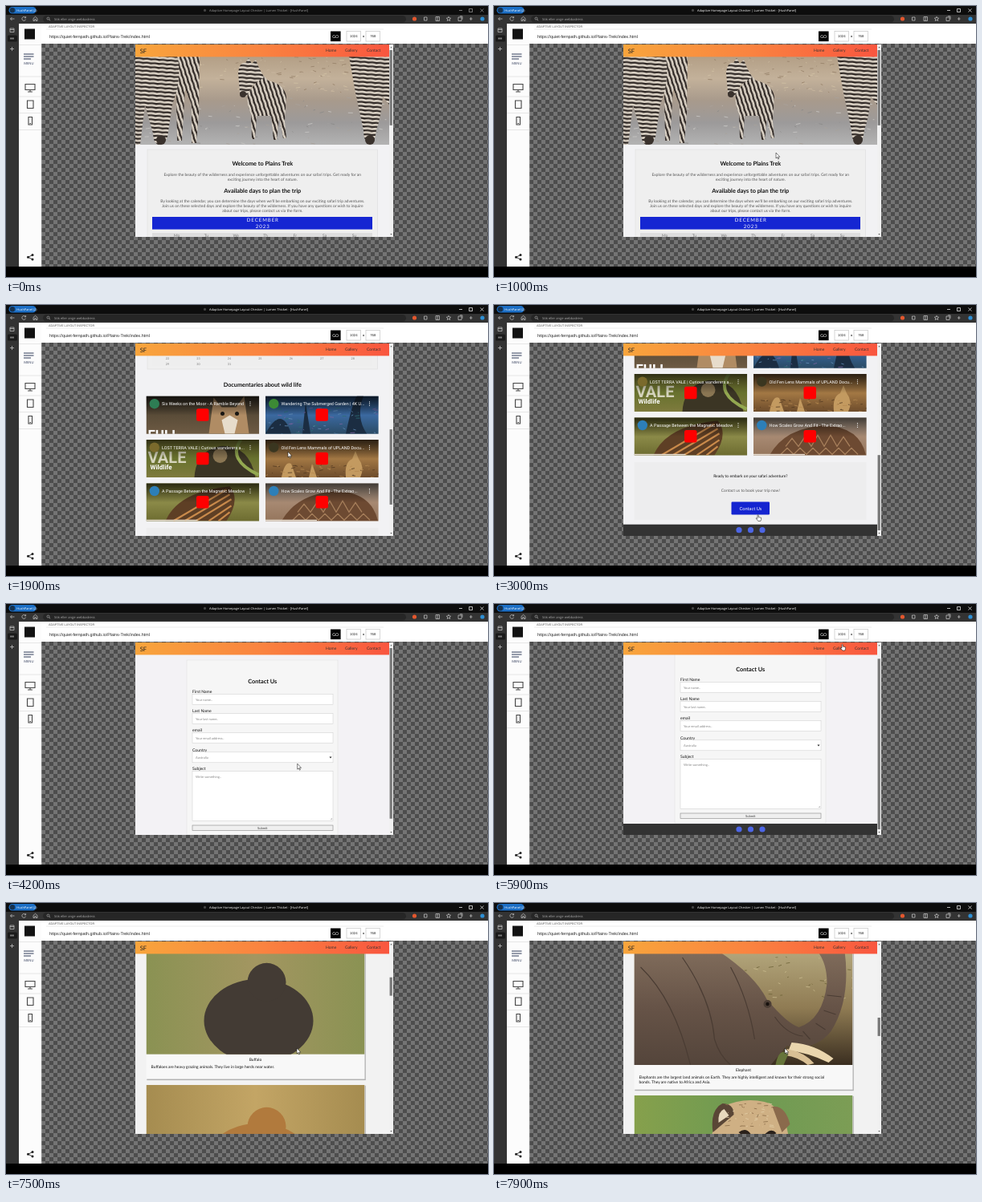
An HTML page that plays this animation: 600x338 px, repeating every 8000 ms.

```html
<!DOCTYPE html>
<html lang="en">
<head>
<meta charset="utf-8">
<title>Site preview</title>
<style>
  html, body { margin: 0; width: 100%; height: 100%; overflow: hidden; background: #000; }
  #stage { display: block; width: 600px; height: 338px; font-family: Lato, sans-serif; text-rendering: geometricPrecision; }
  .ui { font-family: "Open Sans", sans-serif; }
  .arial { font-family: "Liberation Sans", sans-serif; }
  .roboto { font-family: Roboto, sans-serif; }
  .bold { font-weight: 700; }
  .mid { text-anchor: middle; }
</style>
</head>
<body>
<svg id="stage" viewBox="0 0 600 338"></svg>
<script>
const rect = (x, y, w, h, fill, more = '') => `<rect x="${x}" y="${y}" width="${w}" height="${h}" fill="${fill}" ${more}/>`;
const disc = (x, y, r, fill, more = '') => `<circle cx="${x}" cy="${y}" r="${r}" fill="${fill}" ${more}/>`;
const path = (d, fill, more = '') => `<path d="${d}" fill="${fill}" ${more}/>`;
const line = (d, color, width = .7) => path(d, 'none', `stroke="${color}" stroke-width="${width}"`);
const text = (x, y, size, fill, str, cls = '', more = '') =>
  `<text x="${x}" y="${y}" font-size="${size}" fill="${fill}" class="${cls}" ${more}>${str}</text>`;
const centered = (y, size, fill, str, cls = '') => text(319.3, y, size, fill, str, 'mid ' + cls);
const heading = (y, str) => centered(y, 7.3, '#111', str, 'bold');
const crop = (x, y, w, h, inner) => `<svg x="${x}" y="${y}" width="${w}" height="${h}">${inner}</svg>`;

const gradients = [];
function gradient(colors, across = false) {
  const id = 'g' + gradients.length;
  const stops = colors.map((c, i) => `<stop offset="${i / (colors.length - 1)}" stop-color="${c}"/>`).join('');
  gradients.push(`<linearGradient id="${id}" x2="${across ? 1 : 0}" y2="${across ? 0 : 1}">${stops}</linearGradient>`);
  return `url(#${id})`;
}

let seed = 7;
const random = () => (seed = seed * 16807 % 2147483647) / 2147483647;
function specks(count, x, y, w, h, colors) {
  let out = '';
  for (let i = 0; i < count; i++) {
    const px = x + random() * w, py = y + random() * h;
    out += line(`M${px.toFixed(1)} ${py.toFixed(1)}l${(random() * 6).toFixed(1)} ${(random() * 3 - 1.5).toFixed(1)}`, colors[i % colors.length], .8);
  }
  return out;
}

// Photographs, as simple shapes
const hero = rect(0, 0, 316, 110, gradient(['#b39f86', '#c3b19a', '#a89a8c', '#9c9a9a', '#b3b3b3'])) +
  specks(150, 0, 0, 316, 45, ['#d2c2a5', '#957f68', '#c9b8a0']) +
  specks(90, 0, 50, 316, 60, ['#8b8988', '#c9c8c6', '#a9a29b']) +
  path('M50 0H80L79 70 76 108H70L70 60 62 40 58 105H52Z', 'url(#slant)') +
  path('M0 0H52C58 20 52 45 46 60L40 100Q36 110 28 110Q22 106 22 96L12 60 6 110H0Z', 'url(#flat)') +
  disc(32, 104, 6, '#3a322d') +
  path('M140 46Q138 60 144 72L145 103H149L151 74H169L172 104H176L179 76 184 102H188L186 80 188 50Q185 34 165 30L158 22Z', 'url(#slant)') +
  path('M128 20Q130 6 137 8L141 2 145 9 150 4 153 12 160 26 146 36 138 50Q130 52 130 44Z', 'url(#flat)') +
  disc(134, 47, 4, '#3a322d') +
  path('M266 0H316V60L308 50Q306 75 300 92Q298 109 291 110Q284 106 284 92L274 45Z', 'url(#flat)') +
  disc(292, 104, 6, '#3a322d');

const aardvark = rect(0, 0, 272, 142, gradient(['#9b9070', '#857957', '#8e815f'])) +
  specks(90, 0, 0, 272, 30, ['#b3a783', '#766a4b']) +
  path('M0 22Q60 8 120 14Q200 18 272 40V80Q200 84 150 110L40 100Q20 60 0 50Z', gradient(['#4e4534', '#2d2822'])) +
  path('M0 68Q40 90 70 110L140 112Q190 100 230 78Q255 66 272 60V142H0Z', '#a99a79') +
  specks(230, 0, 100, 272, 42, ['#cdbf9d', '#837655', '#bdae8b']) +
  path('M56 40Q64 16 100 14Q122 14 130 28L146 22Q150 40 158 58L166 74Q166 82 160 82L140 70Q136 84 128 90L122 124H108L106 100Q94 92 84 104L80 122H70L72 96Q60 110 58 130H52Q54 100 52 72Z', gradient(['#5d5140', '#372f28'])) +
  path('M114 14Q128 18 134 32L126 36Z', '#d8512e') + path('M143 14Q152 26 148 40L142 34Z', '#a5513c') +
  disc(150, 53, 1.2, '#111');

const elephant = rect(0, 0, 272, 142, gradient(['#b3a67c', '#8f7b53', '#3a2e20'])) +
  specks(60, 100, 0, 172, 60, ['#c9bb8f', '#6d6338']) +
  path('M0 0H105Q150 30 165 60Q190 90 205 95Q235 85 240 40Q240 15 228 0H262Q270 60 245 100Q225 125 190 118L170 142H0Z', gradient(['#806c5b', '#665347', '#54453b'])) +
  line('M8 20Q50 60 70 142M60 8Q96 60 100 110Q106 130 120 142M120 20Q142 60 150 110M175 82Q190 104 210 106M210 100l9 10M226 90l12 8M236 74l15 5M240 55l18 2', '#4a3c33', 1.2) +
  disc(166, 66, 5, '#4b3d34') + disc(166, 66, 2.2, '#17110e') +
  path('M196 114Q225 116 248 134L242 139Q215 126 192 124Z', '#ead6ae') +
  path('M190 122Q212 126 224 140L216 142Q204 132 188 130Z', '#d9c095') +
  path('M176 142Q180 120 192 128L186 142Z', '#66743a');

const cheetah = rect(0, 0, 272, 142, gradient(['#86a04c', '#6d9a52', '#7c9d55'], true)) +
  path('M84 142Q92 40 110 14Q136 2 162 8Q186 14 192 50L206 142Z', '#cfb084') +
  path('M98 46Q94 18 110 10Q124 10 124 24Z', '#5a4636') + path('M105 34Q104 20 112 17L118 25Z', '#e7d8bd') +
  path('M172 14Q188 12 194 36L184 46Z', '#8a6a4c') +
  path('M130 46q9-7 15 2l-8 4Z', '#2a211b') + path('M163 48q8-8 14-1l-7 5Z', '#2a211b') +
  specks(50, 112, 10, 60, 30, ['#8a6b48', '#e3cfa8']);

const blurred = (a, b, c) => rect(0, 0, 272, 142, gradient([a, b, a], true)) +
  `<ellipse cx="140" cy="100" rx="68" ry="52" fill="${c}"/>` + disc(150, 52, 24, c);

const animals = [
  ['Aardvark', 'The Aardvark is a nocturnal mammal native to Africa. It is known for its long tongue, which it uses to capture ants', 'and termites for food. Aardvarks are solitary animals and are expert diggers.', aardvark],
  ['Antelope', 'Antelopes are swift grazing animals. They live in herds on open grassland.', '', blurred('#7d7944', '#8d7550', '#a4814f')],
  ['Buffalo', 'Buffaloes are heavy grazing animals. They live in large herds near water.', '', blurred('#8a9253', '#a39661', '#433b34')],
  ['Lion', 'Lions live in family groups. They rest by day and hunt at night.', '', blurred('#a58c50', '#c3a565', '#b17a3d')],
  ['Giraffe', 'Giraffes are the tallest land animals. They feed on the leaves of trees.', '', blurred('#8eabb2', '#b5bd9a', '#b68a50')],
  ['Elephant', 'Elephants are the largest land animals on Earth. They are highly intelligent and known for their strong social', 'bonds. They are native to Africa and Asia.', elephant],
  ['Cheetah', 'Cheetahs are the fastest land animals.', '', cheetah]
];

const lettering = text(2, 29, 20, '#e9e6d6', 'VALE', 'roboto bold', 'opacity=".85"') + text(5, 37, 8, '#fff', 'Wildlife', 'roboto bold');
const videos = [
  ['Six Weeks on the Moor - A Ramble Beyond', '#2e7d54', ['#3a3328', '#5a4c38', '#6e5b44'],
    path('M78 47L84 2 94 14H112L122 0 128 47Z', '#b08c64') + path('M94 30L104 24 114 30 110 47H98Z', '#e7dccb') +
    disc(95, 22, 2.5, '#1a1713') + disc(113, 22, 2.5, '#1a1713') + text(2, 54, 17, '#fff', 'FULL', 'roboto bold')],
  ['Wandering The Submerged Garden | 4K U...', '#3c8a35', ['#24466e', '#3b69a0', '#2a4a63'],
    path('M0 47Q20 10 32 47ZM100 47Q108 8 114 0H122Q112 26 126 47ZM46 47L50 8 56 47Z', '#1b2d42') + specks(60, 0, 15, 140, 32, ['#648fb8', '#7a63a0', '#2c6e73'])],
  ['LOST TERRA VALE | Curious wanderers a...', '#7a6a2c', ['#8c8a3c', '#68722e', '#7f7b3e'],
    path('M60 47Q62 14 92 8Q128 6 136 47Z', '#3b3524') + disc(92, 20, 9, '#8a7653') + line('M118 0Q100 25 140 44', '#93a850', 4) + lettering],
  ['Old Fen Lens Mammals of UPLAND Docu...', '#3a3620', ['#7c5a33', '#a37844', '#6b4a2a'],
    path('M20 47Q24 26 32 30L38 47ZM54 47L58 30 64 47ZM100 47Q98 28 108 24L112 14 116 24Q124 34 118 47Z', '#c39a60') + specks(50, 0, 32, 140, 15, ['#b68a51', '#543a21'])],
  ['A Passage Between the Magnetic Meadow', '#2d7fb8', ['#7b7a34', '#8b8a48', '#6c6b30'],
    path('M24 47Q40 10 104 4Q118 20 100 47Z', '#5e3f25') + line('M34 47L100 8M48 47L104 14M62 47L106 20M78 47L106 28M90 47L104 36', '#c98a4b', 2.2) +
    rect(0, 45.5, 64, 1.5, '#e9dfd2')],
  ['How Scales Grow And Fit - The Extrao...', '#2d7fb8', ['#b9a898', '#a78972', '#94755c'],
    path('M20 47Q40 12 90 10Q132 12 140 47Z', '#6d4a32') + line('M40 36l8-10 8 10 8-12 8 12 8-14 8 14 8-14 8 14 8-12 8 12M34 46l8-8 8 8 8-8 8 8 8-8 8 8 8-8 8 8 8-8 8 8 8-8 8 8', '#a77f5b', 1.3) +
    rect(0, 45.5, 64, 1.5, '#e9dfd2')]
];
function video([title, badge, colors, art], i) {
  return crop(174.5 + i % 2 * 148.5, 369.5 + (i >> 1) * 54.4, 140.6, 47.2,
    rect(0, 0, 141, 48, gradient(colors)) + art +
    rect(0, 0, 141, 24, gradient(['#000a', '#0000'])) +
    disc(10.3, 9.7, 6.2, badge) +
    text(19.6, 11.9, 5.45, '#fff', title, 'roboto') +
    [7.4, 9.7, 12].map(y => disc(129.5, y, .6, '#fff')).join('') +
    rect(62.5, 15.8, 15.5, 15.5, '#f00', 'rx="2.5"'));
}

const footer = y => rect(161, y, 316, 14.5, '#333') + [305, 319.5, 334].map(x => disc(x, y + 7, 3.6, '#4d66e6')).join('');

function calendar() {
  let out = rect(182, 263, 274, 15.6, '#1526d2') +
    text(319.8, 269.4, 6.1, '#fff', 'DECEMBER', 'mid', 'letter-spacing=".95"') +
    text(319.8, 277, 6.1, '#fff', '2023', 'mid', 'letter-spacing=".95"') +
    rect(182, 283, 274, 6.4, '#ddd') + rect(182, 289.4, 274, 43, '#eee');
  ['Mo', 'Tu', 'We', 'Th', 'Fr', 'Sa', 'Su'].forEach((d, i) => out += text(212.6 + 36.8 * i, 288, 5, '#777', d, 'mid'));
  for (let day = 1; day <= 31; day++) {
    const x = 201 + (day - 1) % 7 * 38.45, y = 302 + Math.floor((day - 1) / 7) * 7.2, open = day === 10 || day === 11;
    if (open) out += rect(x - 4, y - 5.2, 7.6, 7.8, '#1f97c4');
    out += text(x, y, 3.7, open ? '#fff' : '#777', day, 'mid');
  }
  return out;
}

const home = rect(161, 48, 316, 578, '#f2f2f4') + crop(161, 63, 316, 110, hero) +
  rect(176, 179, 286.5, 157, '#efefef', 'stroke="#dcdcdc" stroke-width=".6"') +
  heading(199, 'Welcome to Plains Trek') +
  centered(211.8, 4.94, '#555', 'Explore the beauty of the wilderness and experience unforgettable adventures on our safari trips. Get ready for an') +
  centered(217.6, 4.94, '#555', 'exciting journey into the heart of nature.') +
  heading(232.6, 'Available days to plan the trip') +
  centered(245, 4.94, '#555', 'By looking at the calendar, you can determine the days when we\'ll be embarking on our exciting safari trip adventures.') +
  centered(250.8, 4.94, '#555', 'Join us on these selected days and explore the beauty of the wilderness. If you have any questions or wish to inquire') +
  centered(256.6, 4.94, '#555', 'about our trips, please contact us via the form.') +
  calendar() + heading(357.6, 'Documentaries about wild life') + videos.map(video).join('') +
  rect(174.5, 534, 289, 72, '#ededee') +
  centered(553.2, 4.94, '#111', 'Ready to embark on your safari adventure?') +
  centered(571, 4.94, '#555', 'Contact us to book your trip now!') +
  rect(295.5, 583.5, 47.5, 16, '#1424d0', 'rx="1.2"') + centered(593.6, 5.7, '#fff', 'Contact Us') + footer(611.7);

const field = (y, label, hint, h = 13) => text(232, y, 5.1, '#111', label) +
  rect(232, y + 1.2, 175, h, '#fff', 'stroke="#ccc" stroke-width=".5"') + text(236, y + 9.3, 4.1, '#888', hint);
const contact = rect(161, 48, 316, 260, '#f3f2f5') +
  rect(225, 70, 188, 218, '#f6f6f6', 'stroke="#ddd" stroke-width=".5"') +
  heading(98.6, 'Contact Us') +
  field(111.2, 'First Name', 'Your name..') + field(135.3, 'Last Name', 'Your last name..') +
  field(159.4, 'email', 'Your email address..') + field(183.6, 'Country', 'Australia') +
  path('M402.5 190.4h3l-1.5 2Z', '#222') + field(207.2, 'Subject', 'Write something..', 62) +
  line('M404 269l2-2M405 269.2l1.2-1.2', '#777', .4) +
  rect(232, 276, 175, 6.4, '#efefef', 'stroke="#888" stroke-width=".6"') + centered(280.7, 4.1, '#444', 'Submit') + footer(289);

const gallery = rect(161, 48, 316, 2368, '#f2f2f2') + heading(73.8, 'Gallery') +
  animals.map(([name, first, second, photo], i) => {
    const y = 82 + 180 * i;
    return rect(175.3, y + .8, 272.5, 173.4, '#0004') + rect(174.5, y, 272, 172.7, '#f8f8f8') + crop(174.5, y, 272, 142, photo) +
      text(310.5, y + 150, 4.94, '#111', name, 'mid') + text(180.5, y + 159.2, 4.94, '#111', first) + text(180.5, y + 165, 4.94, '#111', second);
  }).join('');

// Browser window and preview tool
const stroke = (d, c = '#ccc') => line(d, c, .7);
const browser = rect(0, 0, 600, 338, '#000') + rect(0, 0, 600, 11, '#0d0d0d') + rect(0, 11, 600, 11, '#333') + rect(0, 22, 16, 303, '#333') +
  rect(3.5, 1, 34, 8.6, '#1c6fc6', 'rx="4.3"') + disc(8, 5.2, 3.2, '#16324f') + text(13.3, 6.7, 3.9, '#fff', 'HushPanel (2)', 'ui') +
  disc(247.5, 5.4, 1.6, '#444') +
  text(314.5, 6.8, 3.95, '#fff', 'Adaptive Homepage Layout Checker | Lumen Thicket - [HushPanel]', 'ui mid', 'id="title"') +
  `<g id="buttons">${stroke('M564 5.5h4M576.5 3.5h4v4h-4ZM590.5 3.5l4 4m0-4l-4 4', '#fff')}</g>` +
  stroke('M10.5 16H5.5l2-2m-2 2l2 2M24.2 14.4a2.4 2.4 0 1 0 .4 2.2M24.6 13v1.8h-1.8M34 18.5v-3l2.5-2.2 2.5 2.2v3h-1.8v-2h-1.4v2Z') +
  rect(46, 12, 452, 8.6, '#262626', 'rx="4.3"') + disc(52.5, 15.6, 1.5, 'none', 'stroke="#bbb" stroke-width=".6"') + stroke('M53.7 16.8l1.4 1.4') +
  text(60, 17.5, 4.1, '#aaa', 'Sök eller ange webbadress', 'ui') +
  disc(508.5, 16, 2.6, '#e4572e') +
  stroke('M520.5 14h3.5v4h-3.5ZM535 13.5h4.5v5H535ZM537.2 13.5v5M551 13.3l.8 1.7 1.9.2-1.4 1.3.4 1.9-1.7-1-1.7 1 .4-1.9-1.4-1.3 1.9-.2ZM563 14h4v4.5h-4ZM565 12.8h3v4M577 16h3.5M578.8 14v4') +
  disc(593, 16, 2.6, '#2d8fd5') +
  stroke('M5 28h5v4.5H5ZM5 29.5h5M7.5 51v5M5 53.5h5') + rect(2, 36.5, 12, 8, '#1a1a1a', 'rx="1.5"') + rect(5, 39.5, 5, 2, '#777') +
  rect(16, 22, 584, 303, '#fff') + rect(44, 47, 556, 278, 'url(#checks)');
const navy = '#2f3b59', dark = '#444';
const tool = rect(16, 22, 28, 303, '#fcfcfc') + stroke('M44 47V325', '#ccc') + rect(23, 28.5, 13, 13, '#111') +
  stroke('M16 88h28M16 113h28M16 133.5h28M16 154.5h28M16 48.5h28', '#ddd') +
  line('M22 60h12.5M22 63h12.5M22 66h9', navy, 1.2) + text(28.3, 72.6, 4.2, navy, 'MENU', 'mid ui') +
  line('M24 97.5h12v7H24ZM30 104.5v2.5M27 107h6', dark, 1.1) + line('M26.5 118h7.5v9.5h-7.5Z', dark, 1.1) + line('M28 138.5h4.5v9.5H28ZM29.5 146.5h1.5', dark, 1.1) +
  line('M33 310.5L27.5 313.3 33 316', '#222', .9) + disc(33, 310.5, 1.5, '#222') + disc(27.5, 313.3, 1.5, '#222') + disc(33, 316, 1.5, '#222') +
  text(53, 27, 3.75, '#555', 'ADAPTIVE LAYOUT INSPECTOR', 'arial') + stroke('M50 29h420', '#e4e4e4') +
  text(54, 39.8, 5.35, '#222', 'https://quiet-fernpath.github.io/Plains-Trek/index.html', 'arial') +
  rect(404, 31.5, 12.6, 12.6, '#000') + text(410.3, 39.8, 5.2, '#fff', 'GO', 'mid') +
  [[424, 1024], [448, 768]].map(([x, n]) => rect(x, 31.5, 17.5, 12.5, '#fff', 'stroke="#bbb" stroke-width=".6"') + text(x + 8.8, 39.3, 4.3, '#222', n, 'mid arial')).join('') +
  text(445, 39.3, 4.2, '#222', 'x', 'mid bold');

const header = rect(161, 48, 316, 15.4, gradient(['#f8a53c', '#fa8340', '#f9563f'], true)) + text(166.7, 58.6, 7.6, '#222', 'SF') +
  text(398, 57.4, 5, '#333', 'Home') + text(422, 57.4, 5, '#333', 'Gallery') + text(449, 57.4, 5, '#333', 'Contact');
const scrollbar = rect(477, 48, 5, 240, '#f1f1f1') + path('M478.3 52.3h2.4l-1.2-1.6ZM478.3 284h2.4l-1.2 1.6Z', '#555') +
  rect(477.6, 55, 3.2, 20, '#777', 'id="thumb"');
const outline = 'stroke="#000" stroke-width=".5"';
const pointer = `<g id="cursor">${path('M0 0V7L1.6 5.6 2.7 8 3.7 7.5 2.7 5.2H4.8Z', '#fff', outline + ' id="arrow"')}` +
  path('M0 .6Q.6-.4 1.2.6V3L4.6 3.8V6L3.8 8H.8L-1.8 4.6-1 4 0 5Z', '#fff', outline + ' id="hand"') + '</g>';

const stripes = (id, turn) => `<pattern id="${id}" width="10" height="5" patternUnits="userSpaceOnUse" patternTransform="rotate(${turn})">${rect(0, 0, 10, 5, '#ded5c8')}${path('M0 1Q5 0 10 1V3.4Q5 2.2 0 3.4Z', '#2d2623')}</pattern>`;
const stage = document.getElementById('stage');
stage.innerHTML = `<defs>${gradients.join('')}${stripes('flat', 4)}${stripes('slant', 72)}
  <pattern id="checks" x="44" y="47" width="10" height="10" patternUnits="userSpaceOnUse">${rect(0, 0, 10, 10, '#747474')}${path('M0 0h5v10h5V5H0Z', '#4d4d4d')}</pattern>
  <clipPath id="view">${rect(161, 48, 316, 240, '#000')}</clipPath></defs>
  ${browser}${tool}<g clip-path="url(#view)"><g id="home">${home}</g><g id="contact">${contact}</g><g id="gallery">${gallery}</g>${header}</g>${scrollbar}${pointer}`;

// Each entry: time, then values
const pages = [
  { id: 'home', from: 0, to: 4000, height: 578, scroll: [[1100, 0], [1500, 99], [1900, 256], [2300, 338]] },
  { id: 'contact', from: 4000, to: 6000, height: 255, scroll: [[4300, 0], [4600, 15]] },
  { id: 'gallery', from: 6000, to: 8000, height: 2368, scroll: [[7200, 0], [7900, 922]] }
];
const travel = [[200, 348, 268], [900, 351, 183], [2300, 351, 183], [2800, 328, 261.5], [3600, 328, 261.5], [3800, 343, 228], [4000, 343, 228],
  [4700, 412, 127], [4900, 412, 127], [5300, 460, 44], [5700, 433, 50], [6000, 433, 50], [6600, 362, 181]];

function at(keys, t) {
  const next = keys.findIndex(k => k[0] > t);
  if (next === 0) return keys[0].slice(1);
  if (next < 0) return keys[keys.length - 1].slice(1);
  const a = keys[next - 1], b = keys[next], p = (t - a[0]) / (b[0] - a[0]);
  return a.slice(1).map((v, i) => v + (b[i + 1] - v) * p);
}
const set = (id, name, value) => document.getElementById(id).setAttribute(name, value);
const show = (id, on) => set(id, 'display', on ? 'inline' : 'none');

function draw(now) {
  const t = Math.floor(now % 8000 / 100) * 100;
  for (const page of pages) {
    const open = t >= page.from && t < page.to;
    show(page.id, open);
    if (!open) continue;
    const [y] = at(page.scroll, t), scale = 226 / page.height;
    set(page.id, 'transform', `translate(0 ${-y})`);
    set('thumb', 'y', 55 + y * scale);
    set('thumb', 'height', 240 * scale);
  }
  const [x, y] = at(travel, t), overLink = t >= 2800 && t <= 3600 || t >= 5600 && t < 6100;
  show('cursor', t >= 200);
  show('arrow', !overLink);
  show('hand', overLink);
  set('cursor', 'transform', `translate(${x} ${y})`);
  set('title', 'fill', t < 200 ? '#999' : '#fff');
  set('buttons', 'opacity', t < 200 ? .6 : 1);
  requestAnimationFrame(draw);
}
requestAnimationFrame(draw);
</script>
</body>
</html>
```
